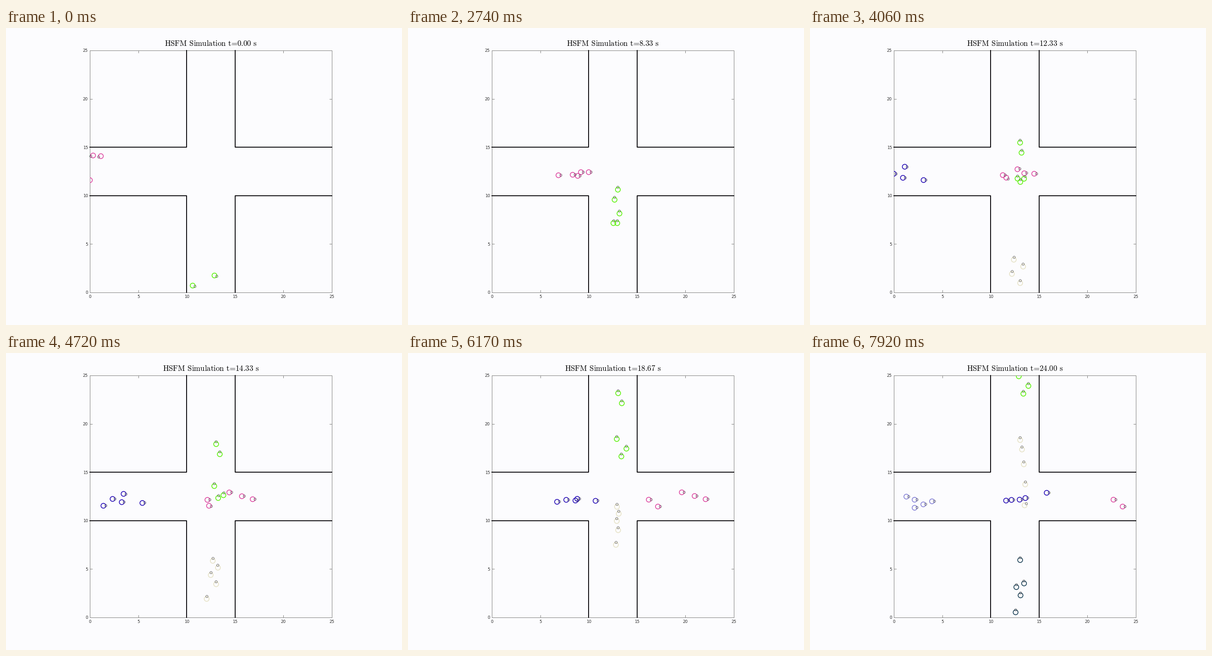
Recreate the animation shown at these times as a matplotlib script. Size 864 by 648 pixels, loop 8 s.

```python
import numpy as np
import matplotlib.pyplot as plt
from matplotlib.animation import FuncAnimation
from matplotlib.patches import Rectangle

plt.rcParams["font.family"] = "DejaVu Sans"
plt.rcParams["mathtext.fontset"] = "cm"

W, H = 864, 648
LEFT, TOP, SIDE = 183, 49, 528
RIGHT, BOTTOM = LEFT + SIDE, TOP + SIDE
UNIT = SIDE / 25
NEAR, FAR = 10 * UNIT, 15 * UNIT
LANE_X, LANE_Y = 458.5, 321
BACK, INK = "#fcfcfe", "#262626"
LOOP, INTERVAL = 8000, 25
RANK = np.arange(5)


def smooth(u):
    u = np.clip(u, 0, 1)
    return u * u * (3 - 2 * u)


class Group:
    """Five walkers who gather in a lane, lose time at the crossing and fan out."""

    def __init__(self, color, upward, birth, speed, starts, sides, exits=0, lags=0):
        self.color, self.upward, self.birth, self.speed = color, upward, birth, speed
        self.starts, self.sides = np.array(starts), np.array(sides)
        self.exits, self.lags = np.array(exits), np.array(lags)
        self.first_angle = 0.35 if upward else 2.8

    def position(self, age):
        ramp = age - 3.1 * (1 - np.exp(-age / 3.1))
        free = self.starts + self.speed * ramp
        cross = smooth((free - NEAR) / 150)
        along = free - self.lags * cross
        gathered = self.sides * (1 - 0.85 * smooth(free / 190))
        across = gathered * (1 - cross) + self.exits * cross
        if self.upward:
            return LANE_X + across, BOTTOM - along
        return LEFT + along, LANE_Y + across

    def heading(self, age):
        late = max(age, 1)
        (x0, y0), (x1, y1) = self.position(late - 0.1), self.position(late + 0.1)
        goal = np.arctan2(y1 - y0, x1 - x0)
        turn = (self.first_angle - goal + np.pi) % (2 * np.pi) - np.pi
        return goal + turn * np.exp(-age / 1.8)


# Starts are measured along the corridor, sides and exits across it, in pixels.
groups = [
    Group("#de48a2", False, 0, 8.55, [24, 7, 0, -11, -42], [-43, -43, 11, -5, 1],
          exits=[-2, -17, -9, 14, -1], lags=[10, 45, 10, 79, 68]),
    Group("#5cf20c", True, 0, 8.55, [37, 15, -15, -36, -36], [-4, -52, 17, -43, -8],
          exits=[0, 8, 18, -3, 7], lags=[0, 0, 69, 27, 65]),
    Group("#2208b6", False, 30, 8.7, [28, -13, -17, -37, -57], [14, -19, 6, -3, 13],
          exits=-16 * 0.3 ** RANK, lags=33 + 12 * RANK),
    Group("#e6e2c6", True, 30, 9.1, [33, 18, 2, -18, -50], [-19, 8, -20, 0, -23],
          exits=4 * RANK, lags=5.5 * RANK ** 2),
    Group("#8480d6", False, 60, 8.5, [7, -12, -31, -31, -49], [4, 12, 19, -1, -8]),
    Group("#183e54", True, 60, 8.5, [49, -2, -10, -28, -65], [0, 12, -11, 1, -10]),
]

fig = plt.figure(figsize=(W / 72, H / 72), dpi=72, facecolor=BACK)
ax = fig.add_axes([0, 0, 1, 1])
ax.set(xlim=(0, W), ylim=(H, 0))
ax.axis("off")


def line(xs, ys, **style):
    ax.plot(xs, ys, **style)


edge = dict(color="#80807e", lw=1)
line([LEFT, RIGHT, RIGHT, LEFT, LEFT], [TOP, TOP, BOTTOM, BOTTOM, TOP], **edge)
for v in range(0, 26, 5):
    x, y = LEFT + v * UNIT, BOTTOM - v * UNIT
    for end, step in ((TOP, 5), (BOTTOM, -5)):
        line([x, x], [end, end + step], **edge)
    for end, step in ((LEFT, 5), (RIGHT, -5)):
        line([end, end + step], [y, y], **edge)
    ax.text(x, 589.3, str(v), size=8.8, color=INK, ha="center", va="baseline")
    ax.text(179, y + 3.4, str(v), size=8.8, color=INK, ha="right", va="baseline")

# Four corner walls leave a crossing of two corridors.
for x_end, x in ((LEFT, LEFT + NEAR), (RIGHT, LEFT + FAR)):
    for y_end, y in ((TOP, BOTTOM - FAR), (BOTTOM, BOTTOM - NEAR)):
        line([x_end, x, x], [y, y, y_end], color="#060408", lw=1.9)

bodies = ax.scatter([], [], s=10.6 ** 2, facecolors="none", linewidths=1.6, zorder=5)
bodies.set_clip_path(Rectangle((LEFT, TOP), SIDE, SIDE, transform=ax.transData))
heads = ax.scatter([], [], s=5.1 ** 2, facecolors="none", edgecolors="#3c3c40",
                   linewidths=0.7, zorder=6, clip_on=False)
title = ax.text(447, 39, "", size=16.8, color="black", ha="center", va="baseline")


def step_at(ms):
    """Steps last 100, 130 and 100 ms in turn."""
    cycle, rest = divmod(ms, 330)
    return int(3 * cycle + (rest >= 100) + (rest >= 230))


def title_text(seconds):
    gap = r"\hspace{0.38}"
    tight = r"\hspace{-0.2}"
    return (rf"$\mathrm{{HSFM{gap}Simulation{gap}t{tight}={tight}"
            rf"{seconds:.2f}{gap}s}}$")


def update(frame):
    k = step_at(frame * INTERVAL + INTERVAL - 1)
    spots, tips, colors = [], [], []
    for group in groups:
        age = k - group.birth
        if age < 0:
            continue
        angles = group.heading(age)
        for x, y, a in zip(*group.position(age), angles):
            if x > RIGHT or y < TOP:
                continue
            spots.append((x, y))
            colors.append(group.color)
            hx, hy = x + 5.3 * np.cos(a), y + 5.3 * np.sin(a)
            if LEFT <= hx <= RIGHT and TOP <= hy <= BOTTOM:
                tips.append((hx, hy))
    bodies.set_offsets(spots)
    bodies.set_edgecolors(colors)
    heads.set_offsets(tips)
    title.set_text(title_text(k / 3))
    return bodies, heads, title


anim = FuncAnimation(fig, update, frames=LOOP // INTERVAL, interval=INTERVAL,
                     repeat=True, repeat_delay=0)
plt.show()
```
